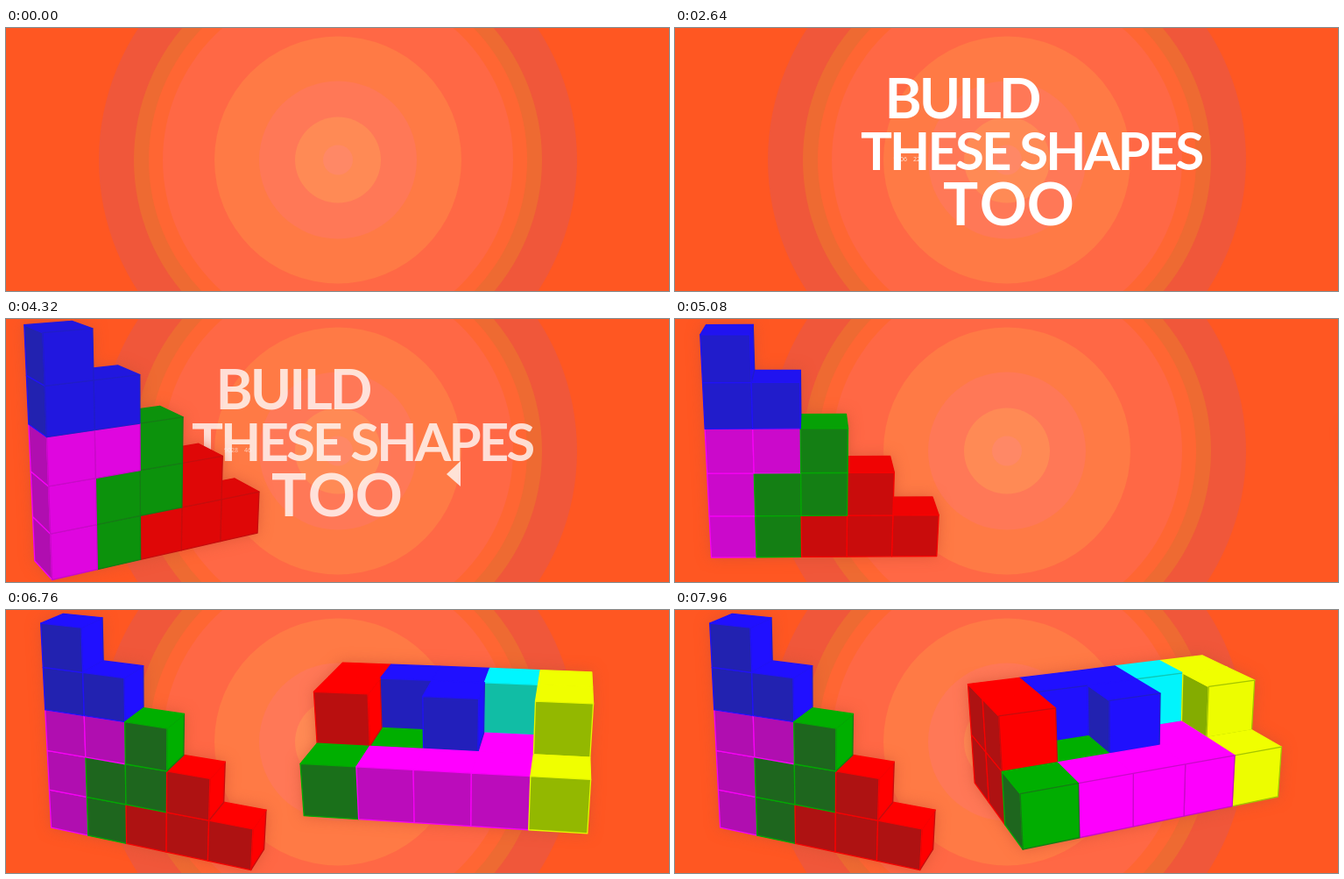
These frames come from a looping animation (757x300 px, 8000 ms). An HTML page with a canvas:

```html
<!DOCTYPE html>
<html lang="en">
<head>
<meta charset="utf-8">
<title>Build these shapes</title>
<style>
html, body { margin: 0; width: 100%; height: 100%; overflow: hidden; background: #ff5722; }
canvas { display: block; }
</style>
</head>
<body>
<canvas id="stage" width="757" height="300"></canvas>
<script>
const ctx = document.getElementById('stage').getContext('2d');
const LOOP = 8000, FOCAL = 953;

const clamp = (v, lo = 0, hi = 1) => Math.min(hi, Math.max(lo, v));
const progress = (t, start, length) => clamp((t - start) / length);
const mix = (a, b, k) => a + (b - a) * k;
const easeOut = p => 1 - (1 - p) ** 3;
const smooth = p => p * p * (3 - 2 * p);
const backOut = p => 1 + 2.70158 * (p - 1) ** 3 + 1.70158 * (p - 1) ** 2;
const dot = (a, b) => a[0] * b[0] + a[1] * b[1] + a[2] * b[2];

// ---------- backdrop ----------
const RINGS = [
  [273, '#f0573a'], [233, '#ee6a32'], [216, '#ff6633'], [200, '#ff6845'],
  [141, '#ff7a45'], [90, '#ff7857'], [49, '#ff8a55'], [17, '#ff8866']
];

function drawBackdrop() {
  ctx.fillStyle = '#ff5722';
  ctx.fillRect(0, 0, 757, 300);
  for (const [radius, color] of RINGS) {
    ctx.fillStyle = color;
    ctx.beginPath();
    ctx.arc(379, 150.5, radius, 0, 7);
    ctx.fill();
  }
}

// ---------- lettering ----------
const LINES = [
  { text: 'BUILD', x: 239.5, y: 103, size: 64, gap: -2.9, start: 60, slide: -46 },
  { text: 'THESE SHAPES', x: 212, y: 162, size: 60, gap: -2.9, start: 880, slide: 0 },
  { text: 'TOO', x: 306, y: 225, size: 67, gap: 1.5, start: 1960, slide: 0 }
];

function drawLine(line, t, alpha, drift) {
  ctx.font = `bold ${line.size}px Lato, sans-serif`;
  [...line.text].forEach((letter, i) => {
    const age = t - line.start - 95 * i;
    if (age <= 0) return;
    const shown = progress(age, 0, 150), drop = progress(age, 330, 150);
    const x = line.x + drift + ctx.measureText(line.text.slice(0, i)).width + line.gap * i
      + line.slide * (1 - easeOut(shown));
    const y = line.y - 18 * (1 - smooth(drop)) - 7 * (1 - shown);
    const moving = shown < 1 || (drop > 0 && drop < 1);
    ctx.globalAlpha = alpha * shown * (moving ? 0.4 : 1);
    for (const smear of moving ? [-4, -2, 0, 2, 4] : [0]) ctx.fillText(letter, x, y + smear);
  });
}

function drawLettering(t) {
  const alpha = 1 - progress(t, 4200, 550);
  if (!alpha) return;
  ctx.fillStyle = '#fff';
  LINES.forEach((line, i) => drawLine(line, t, alpha, i === 2 ? -Math.max(0, t - 4200) / 40 : 0));

  if (t > 2000) {
    const tick = Math.floor(t / 40);
    ctx.globalAlpha = alpha * 0.85;
    ctx.font = '7px "Open Sans", sans-serif';
    ctx.fillText(1000 + tick * 2741 % 9000, 249, 152);
    ctx.fillText(10 + tick * 37 % 90, 272, 152);
  }
  const arrive = progress(t, 3500, 500), x = 503 + 67 * (1 - easeOut(arrive));
  ctx.globalAlpha = alpha * arrive;
  ctx.beginPath();
  ctx.moveTo(x, 177);
  ctx.lineTo(x + 16, 162);
  ctx.lineTo(x + 16, 191);
  ctx.fill();
  ctx.globalAlpha = 1;
}

// ---------- cube solids ----------
// Shaded and lit colour of each piece.
const COLORS = {
  b: [[34, 34, 176], [32, 16, 255]],
  m: [[176, 14, 176], [255, 0, 255]],
  g: [[30, 102, 30], [0, 175, 0]],
  r: [[174, 18, 18], [255, 0, 0]],
  y: [[132, 172, 0], [240, 255, 0]],
  c: [[20, 180, 150], [0, 246, 255]]
};
const LIGHT = [0.7, 0.6, 0.4];

// Each face: normal and its four corners as offsets from the cube's centre.
const FACES = [0, 1, 2].flatMap(axis => [-1, 1].map(side => ({
  axis, side,
  normal: [0, 1, 2].map(i => i === axis ? side : 0),
  corners: [[-1, -1], [1, -1], [1, 1], [-1, 1]].map(([u, v]) => {
    const corner = [];
    corner[axis] = side / 2;
    corner[(axis + 1) % 3] = u / 2;
    corner[(axis + 2) % 3] = v / 2;
    return corner;
  })
})));

// Layers run front to back, rows top to bottom.
function buildSolid(layers) {
  const cubes = new Map();
  const height = layers[0].length;
  layers.forEach((rows, z) => rows.forEach((row, y) => [...row].forEach((color, x) => {
    if (color === '.') return;
    const at = [x - 2, (height - 1) / 2 - y, (layers.length - 1) / 2 - z];
    cubes.set(at.join(), { at, color });
  })));
  return [...cubes.values()].map(({ at, color }) => ({
    at, color,
    faces: FACES.filter(f => !cubes.has(at.map((v, i) => v + f.normal[i]).join()))
  }));
}

const STAIRS = buildSolid([['b', 'bb', 'mmg', 'mggr', 'mgrrr']]);
const BLOCK = buildSolid([
  ['.....', 'gmmmy'],
  ['r.b.y', 'rgbmy'],
  ['rbbcy', 'rgccc']
]);

function drawSolid(solid, { x, y, depth, yaw, pitch, scale = 1, glow = 1 }) {
  const rad = Math.PI / 180;
  const cy = Math.cos(yaw * rad), sy = Math.sin(yaw * rad);
  const cp = Math.cos(pitch * rad), sp = Math.sin(pitch * rad);
  const turn = ([a, b, c]) => [
    cy * a - sy * c,
    -sy * sp * a + cp * b - cy * sp * c,
    sy * cp * a + sp * b + cy * cp * c
  ];
  const project = p => {
    const [a, b, c] = turn(p), s = FOCAL * scale / (depth - c);
    return [x + a * s, y - b * s];
  };
  const toEye = p => {
    const [a, b, c] = turn(p);
    return [-a, -b, depth - c];
  };

  const visible = solid
    .map(cube => ({ ...cube, far: Math.hypot(...toEye(cube.at)) }))
    .sort((a, b) => b.far - a.far)
    .flatMap(({ at, color, faces }) => faces.flatMap(face => {
      const normal = turn(face.normal);
      const centre = at.map((v, i) => v + face.normal[i] / 2);
      if (dot(normal, toEye(centre)) <= 0) return [];
      const path = new Path2D();
      face.corners.forEach(c => path.lineTo(...project(c.map((v, i) => v + at[i]))));
      path.closePath();
      return [{ path, color, top: face.axis === 1, lit: glow * clamp(dot(normal, LIGHT) / 0.45) }];
    }));

  // Soft darker halo around the whole silhouette.
  const silhouette = new Path2D();
  visible.forEach(f => silhouette.addPath(f.path));
  ctx.save();
  ctx.shadowColor = 'rgba(205, 80, 50, 0.65)';
  ctx.shadowBlur = 16;
  ctx.fillStyle = '#d05030';
  ctx.fill(silhouette);
  ctx.restore();

  ctx.lineJoin = 'round';
  for (const { path, color, top, lit } of visible) {
    const [dark, bright] = COLORS[color];
    const tone = k => `rgb(${dark.map((v, i) => Math.round(mix(v, bright[i], k)))})`;
    ctx.fillStyle = tone(lit);
    ctx.fill(path);
    ctx.strokeStyle = tone(top ? lit : lit > 0.55 ? 0.3 : 0.9);
    ctx.lineWidth = 1.3;
    ctx.stroke(path);
  }
}

function drawStairs(t) {
  if (t < 2680) return;
  const left = Math.max(0, (6740 - t) / 2420) ** 2, settle = Math.min(1, left);
  drawSolid(STAIRS, {
    x: mix(378, 170, backOut(progress(t, 3941, 960))),
    y: 147 - 12 * settle,
    depth: 18.65 - 1.05 * settle,
    yaw: 23.4 - 51.4 * left,
    pitch: 21.5 - 4.5 * settle,
    scale: easeOut(progress(t, 2680, 700)),
    glow: 1 - 0.4 * settle
  });
}

function drawBlock(t) {
  if (t < 5060) return;
  drawSolid(BLOCK, {
    x: mix(960, 512, easeOut(progress(t, 5060, 580))),
    y: 149,
    depth: 15.6,
    yaw: t < 6760 ? mix(8, 40, (6760 - t) / 1080) : mix(8, -24.5, (t - 6760) / 1200),
    pitch: 20.7
  });
}

function frame() {
  const t = performance.now() % LOOP;
  drawBackdrop();
  drawLettering(t);
  drawStairs(t);
  drawBlock(t);
  requestAnimationFrame(frame);
}
frame();
</script>
</body>
</html>
```
